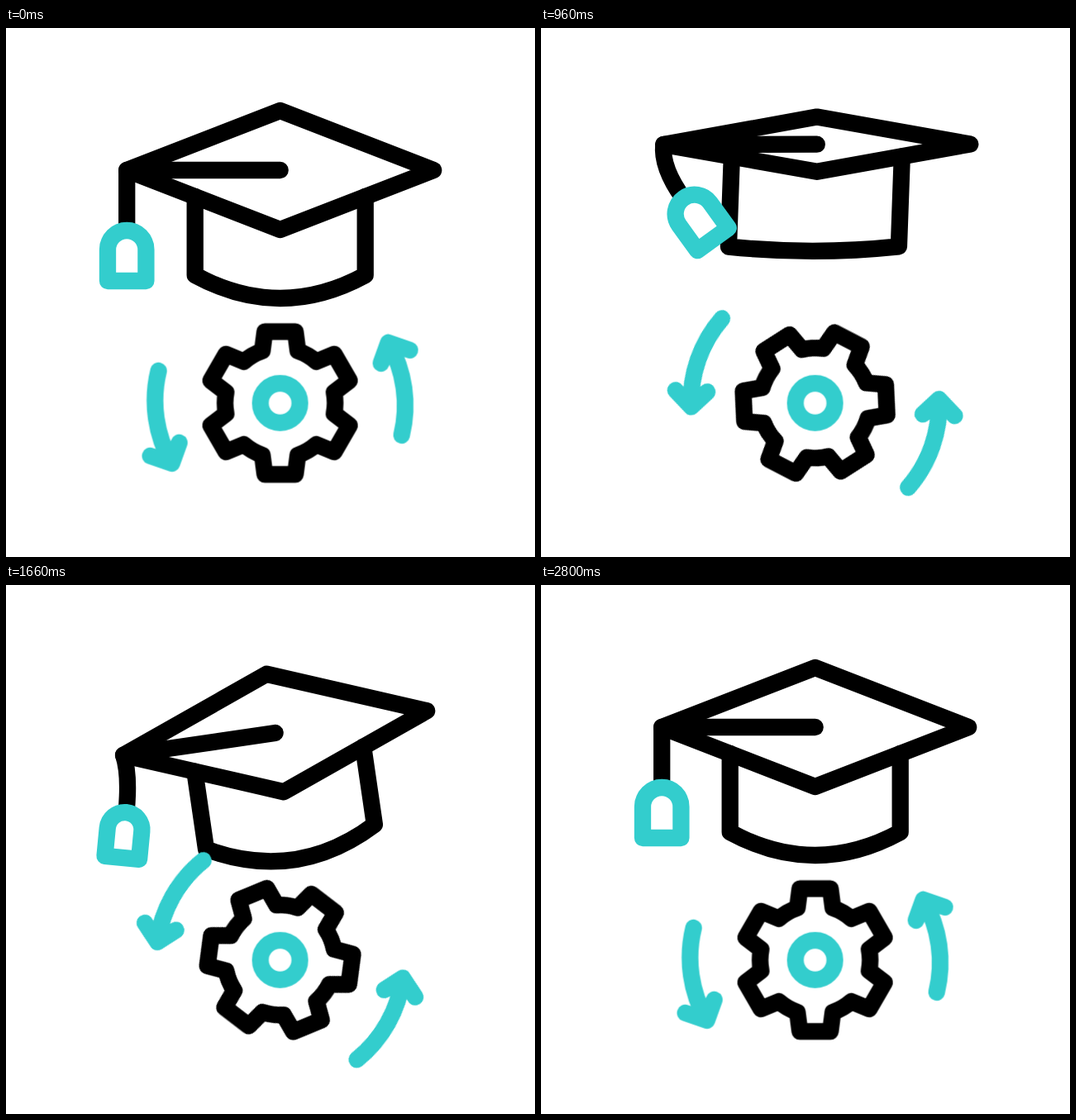
An HTML page that plays this animation: 640 by 640 pixels, repeating every 3.6 s.

```html
<!DOCTYPE html>
<html lang="en">
<head>
<meta charset="utf-8">
<title>Graduation cap and gear</title>
<style>
  html, body { margin: 0; width: 100%; height: 100%; overflow: hidden; background: #fff; }
  svg { display: block; width: 100%; height: 100%; }
  path, circle { fill: none; stroke: #000; stroke-width: 20.3; stroke-linecap: round; stroke-linejoin: round; }
  .teal { stroke: #33cdcd; }
  #string { stroke-linecap: butt; }
  #spin { animation: spin 3600ms infinite; }
  @keyframes spin {
    0% { transform: rotate(0deg); animation-timing-function: cubic-bezier(.45, 0, .4, 1); }
    65.6% { transform: rotate(-361.8deg); animation-timing-function: ease-in-out; }
    76%, 100% { transform: rotate(-360deg); }
  }
</style>
</head>
<body>
<svg viewBox="0 0 640 640">
  <g id="cap">
    <path id="band"/>
    <path id="board"/>
    <path d="M-185.5 0H0"/>
  </g>
  <path id="string"/>
  <path id="tag" class="teal"/>
  <g transform="translate(331.6 453.7)">
    <g id="spin">
      <path id="gear"/>
      <path id="arrow" class="teal" d="M-147-39A152 152 0 0 0-131 73M-157 64L-131 73L-122 48"/>
      <use href="#arrow" transform="rotate(180)"/>
    </g>
    <circle class="teal" r="23.9"/>
  </g>
</svg>
<script>
const LOOP = 3600, ARM = 185.5;
const $ = id => document.getElementById(id);
const rad = deg => deg * Math.PI / 180;
const turn = (x, y, deg) => {
  const c = Math.cos(rad(deg)), s = Math.sin(rad(deg));
  return [x * c - y * s, x * s + y * c];
};

// Eased step from 0 to 1 between two times.
const ramp = (t, from, to) => {
  const u = Math.min(1, Math.max(0, (t - from) / (to - from)));
  return u * u * (3 - 2 * u);
};

// Swings from rest through the turning points [time, value].
function swing(t, ...turns) {
  let value = 0, time = 0, last = 0;
  for (const [at, goal] of turns) {
    value += (goal - last) * ramp(t, time, at);
    [time, last] = [at, goal];
  }
  return value;
}

function gearPath() {
  const tooth = [[-21.5, -63], [-18.5, -86.3], [18.5, -86.3], [21.5, -63]];
  const teeth = [0, 60, 120, 180, 240, 300].map(a => tooth.map(([x, y]) => turn(x, y, a)).join("L"));
  const arc = "A66.6 66.6 0 0 1 ";
  return "M" + teeth.join(arc) + arc + tooth[0] + "Z";
}

function drawCap(x, y, tilt, flat) {
  const h = 72 * (1 - flat), top = h * (1 - 103 / ARM);
  const low = 127 - 6 * flat, sag = 28 - 42 * flat, shift = -7.5 * flat;
  $("cap").setAttribute("transform", `translate(${x} ${y}) rotate(${tilt})`);
  $("board").setAttribute("d", `M0 ${-h}L${ARM} 0L0 ${h}L${-ARM} 0Z`);
  $("band").setAttribute("d",
    `M-103 ${top}L${shift - 103} ${low}Q${shift} ${low + 2 * sag} ${shift + 103} ${low}L103 ${top}`);
}

function drawTassel(x, y, t) {
  const hang = swing(t, [800, -36], [1380, 48], [1700, -5], [2500, 2], [2800, 0]);
  const tilt = swing(t, [860, -46], [1360, 50], [1720, 2], [2160, -9], [2520, 5], [2800, 0]);
  const shrink = .1 * (ramp(t, 960, 1240) - ramp(t, 1660, 2000));
  const [dx, dy] = turn(0, 73 - Math.abs(tilt) / 10 - 30 * shrink, hang);
  const [bx, by] = turn(0, -46, tilt);
  const ex = x + dx, ey = y + dy, w = 23.2 * (1 - shrink), h = 61 * (1 - shrink);
  $("string").setAttribute("d", `M${x} ${y}Q${ex + bx} ${ey + by} ${ex} ${ey}`);
  $("tag").setAttribute("d", `M${-w} ${h}V${w}A${w} ${w} 0 0 1 ${w} ${w}V${h}Z`);
  $("tag").setAttribute("transform", `translate(${ex} ${ey}) rotate(${tilt})`);
}

// Two hops, the second about half as strong; the first also tips the cap flat.
function draw(t) {
  const tilt = swing(t, [660, -17.2], [1240, 15.2], [1660, -8.3], [2270, 2], [2720, 0]);
  const flat = .54 * (ramp(t, 620, 960) - ramp(t, 1160, 1660));
  const x = 331.7 + 42 * Math.sin(rad(tilt)) + 4 * flat;
  const y = 172 + swing(t, [620, 14], [1060, -38], [1660, 7], [2080, -26], [2500, 0]);
  const [cx, cy] = turn(-ARM, 0, tilt);
  drawCap(x, y, tilt, flat);
  drawTassel(x + cx, y + cy, t);
}

$("gear").setAttribute("d", gearPath());
const start = performance.now();
function frame() {
  draw((performance.now() - start) % LOOP);
  requestAnimationFrame(frame);
}
frame();
</script>
</body>
</html>
```
